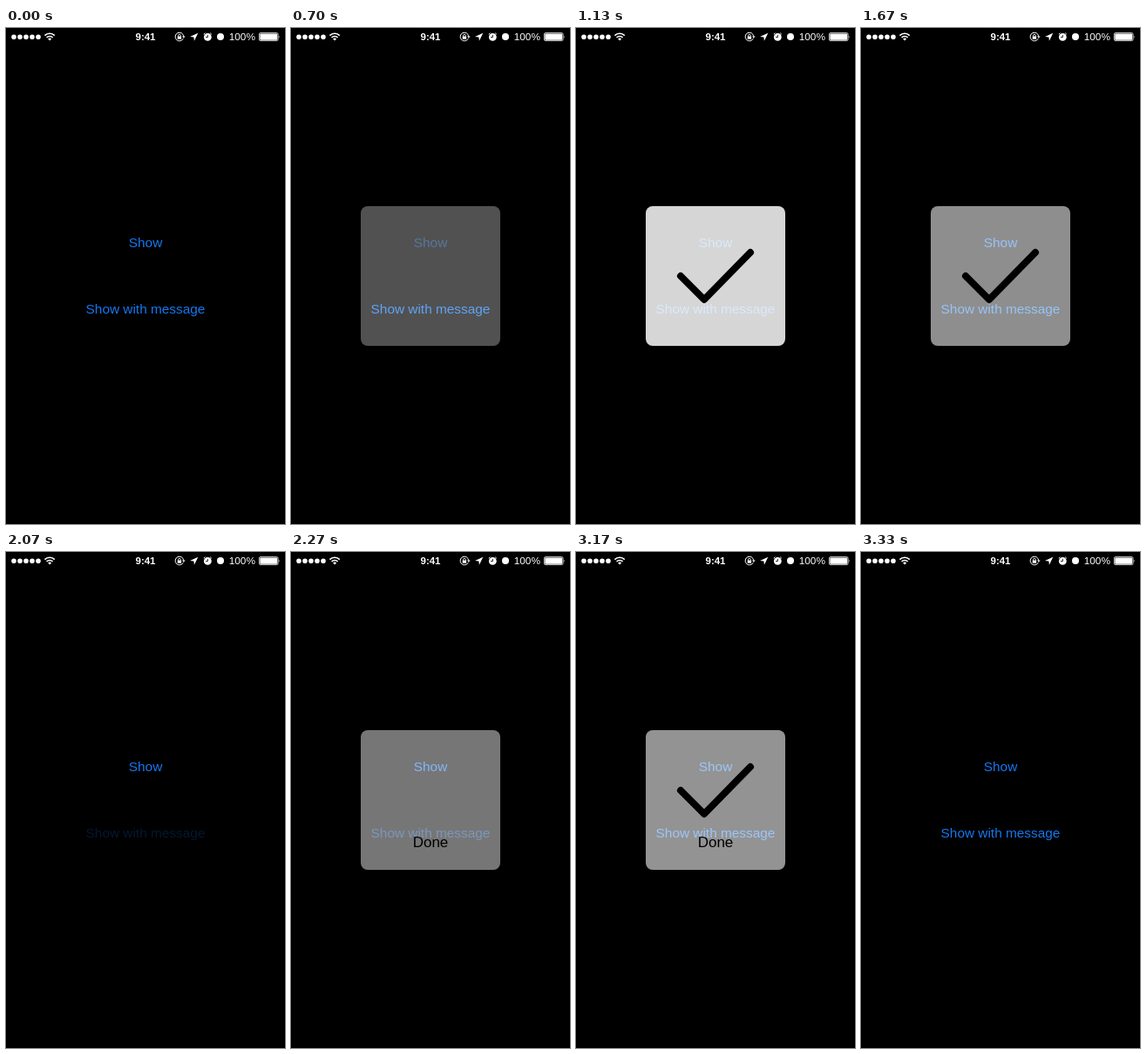
An HTML page that plays this animation: 320x568 px, repeating every 3360 ms.

```html
<!DOCTYPE html>
<html lang="en">
<head>
<meta charset="utf-8">
<title>Success overlay</title>
<style>
  html, body { margin: 0; width: 100%; height: 100%; overflow: hidden; background: #000; }
  svg { display: block; width: 320px; height: 568px; }
  text { font: 15.4px "Liberation Sans", Arial, sans-serif; text-anchor: middle; }
  .status text { font-size: 11.8px; }
  .status .clock { font-size: 11.5px; font-weight: bold; }
  .line { fill: none; stroke: #fff; }
  #done { font-size: 17px; }
</style>
</head>
<body>
<svg viewBox="0 0 320 568">
  <g class="status" fill="#fff">
    <path d="M9 10.2h28.1" stroke="#fff" stroke-width="5.6" stroke-linecap="round" stroke-dasharray="0 7"/>
    <path class="line" d="M44.4 8.6a8 8 0 0 1 11.4 0M46.6 10.9a4.9 4.9 0 0 1 7 0" stroke-width="1.6"/>
    <path d="M48.1 12.5a2.8 2.8 0 0 1 4 0l-2 2z"/>
    <text class="clock" x="160" y="14">9:41</text>
    <path class="line" d="M203.2 12.2a4.8 4.8 0 1 1 .5-2.6"/>
    <path d="M202 9.4h3.6l-1.8 2.4zM196.7 9.6h4.4v3.2h-4.4z"/>
    <path class="line" d="M197.5 9.8v-1a1.4 1.4 0 0 1 2.8 0v1" stroke-width=".9"/>
    <path d="M220.3 5.8l-4.4 9-.5-4.3-4.4-.4z"/>
    <circle cx="231.3" cy="10.4" r="4.4"/>
    <path class="line" d="M226.8 7.2l1.6-1.5M235.8 7.2l-1.6-1.5"/>
    <path d="M231.3 7.8v2.8h-2.2" fill="none" stroke="#000" stroke-width=".9"/>
    <circle cx="246" cy="10" r="4"/>
    <text x="270.8" y="14.2">100%</text>
    <rect class="line" x="290.4" y="5.6" width="21.6" height="9" rx="1.5" stroke-width=".8"/>
    <rect x="291.3" y="6.5" width="19.8" height="7.2" rx=".6"/>
    <path d="M312.8 8.4q1.6 1.7 0 3.4z"/>
  </g>
  <g fill="#1478f0">
    <text id="show" x="160" y="251.4">Show</text>
    <text id="message" x="160" y="327.4">Show with message</text>
  </g>
  <g id="popup">
    <rect x="80" y="204" width="160" height="160" rx="8" fill="#fff" opacity=".84"/>
    <path id="check" d="M120 284l27 27 53-54" pathLength="1" fill="none" stroke="#000"
      stroke-width="8" stroke-linecap="round" stroke-linejoin="round"/>
    <text id="done" x="160" y="338">Done</text>
  </g>
</svg>
<script>
const LOOP = 3360;
const $ = id => document.getElementById(id);
const [show, message, popup, check, done] =
  ['show', 'message', 'popup', 'check', 'done'].map($);

// Times in ms: press, start of fade in, end of check, start and end of fade out
const popups = [
  { button: show, press: 490, start: 575, drawn: 1130, hide: 1570, gone: 1870, lift: 0 },
  { button: message, press: 2060, start: 2110, drawn: 2750, hide: 3100, gone: 3330, lift: 11 }
];

const ramp = (t, from, to) => Math.min(1, Math.max(0, (t - from) / (to - from)));
const ease = p => p * p * (3 - 2 * p);

function draw(t) {
  const p = popups[t < 2000 ? 0 : 1];
  popup.setAttribute('opacity',
    ease(ramp(t, p.start, p.start + 300)) * (1 - ramp(t, p.hide, p.gone)));

  // The pressed button dims at once, then recovers
  for (const label of [show, message]) {
    const pressed = label === p.button && t >= p.press;
    label.setAttribute('opacity', pressed ? 0.2 + 0.8 * ramp(t, p.start, p.start + 400) : 1);
  }

  const stroke = ramp(t, p.start + 300, p.drawn);
  check.setAttribute('transform', `translate(0 ${-p.lift})`);
  check.setAttribute('stroke-dasharray', `${stroke} 2`);
  check.setAttribute('visibility', stroke > 0 ? 'visible' : 'hidden');
  done.setAttribute('visibility', p.lift ? 'visible' : 'hidden');
}

const begin = performance.now();
function tick() {
  draw((performance.now() - begin) % LOOP);
  requestAnimationFrame(tick);
}
tick();
</script>
</body>
</html>
```
